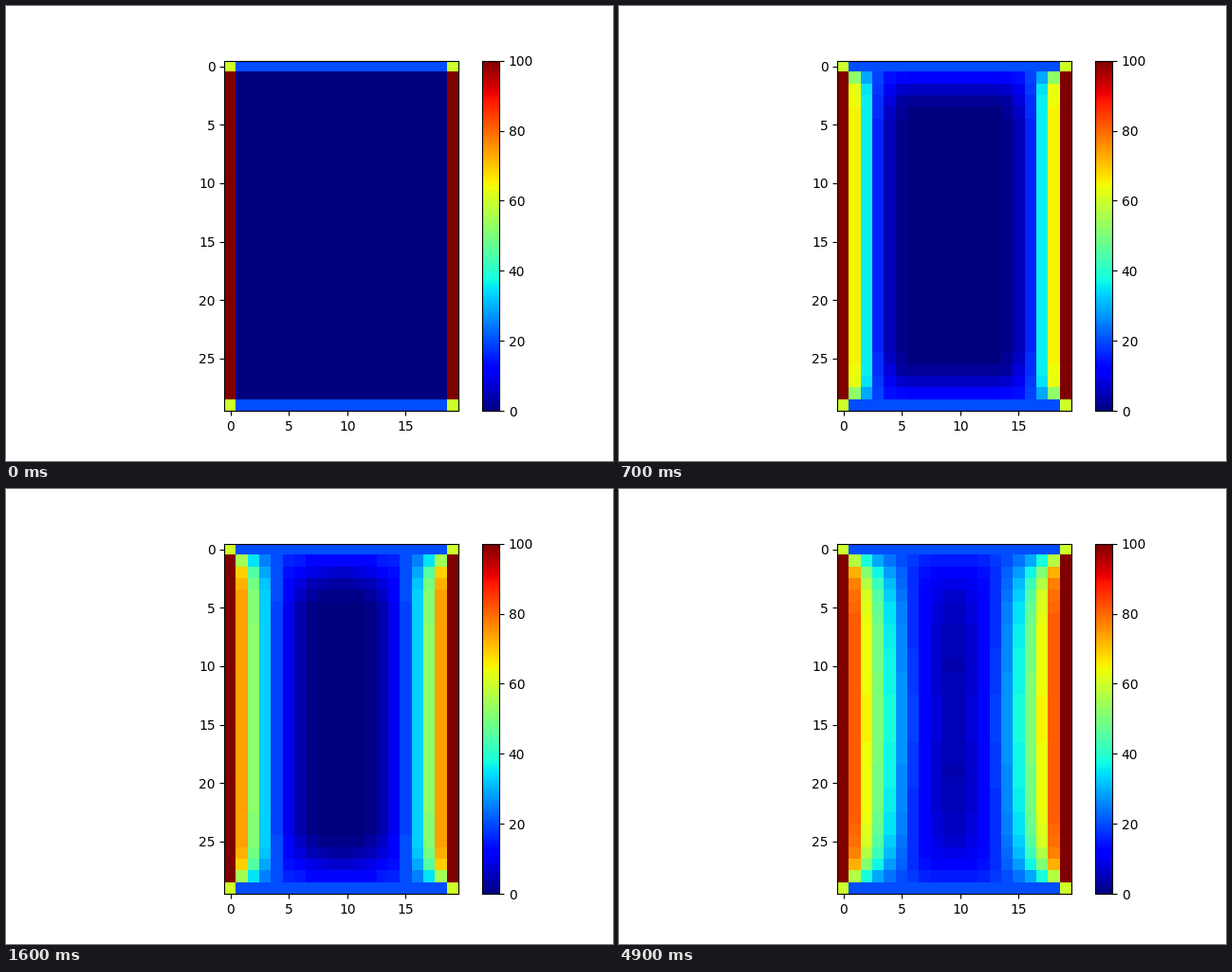
A matplotlib script that plays this animation: 640x480 px, repeating every 5 s.

```python
import matplotlib.pyplot as plt
import numpy as np
from matplotlib.animation import FuncAnimation

ROWS, COLS = 30, 20
FRAMES, INTERVAL = 50, 100
SIDE, END = 100, 20


def start_plate():
    plate = np.zeros((ROWS, COLS), dtype=int)
    plate[[0, -1], :] = END
    plate[:, [0, -1]] = SIDE
    for row in (0, -1):
        plate[row, [0, -1]] = (SIDE + END) // 2
    return plate


def diffuse(plate):
    """Set each inner cell to the whole-number mean of its 3x3 block."""
    total = sum(plate[r:ROWS - 2 + r, c:COLS - 2 + c]
                for r in range(3) for c in range(3))
    result = plate.copy()
    result[1:-1, 1:-1] = total // 9
    return result


plates = [start_plate()]
while len(plates) < FRAMES:
    plates.append(diffuse(plates[-1]))

fig, ax = plt.subplots(figsize=(6.4, 4.8), dpi=100)
image = ax.imshow(plates[0], cmap="jet", vmin=0, vmax=SIDE)
fig.colorbar(image, ax=ax)


def update(step):
    image.set_data(plates[step])
    return [image]


anim = FuncAnimation(fig, update, frames=FRAMES, interval=INTERVAL,
                     repeat=True, repeat_delay=0)
plt.show()
```
